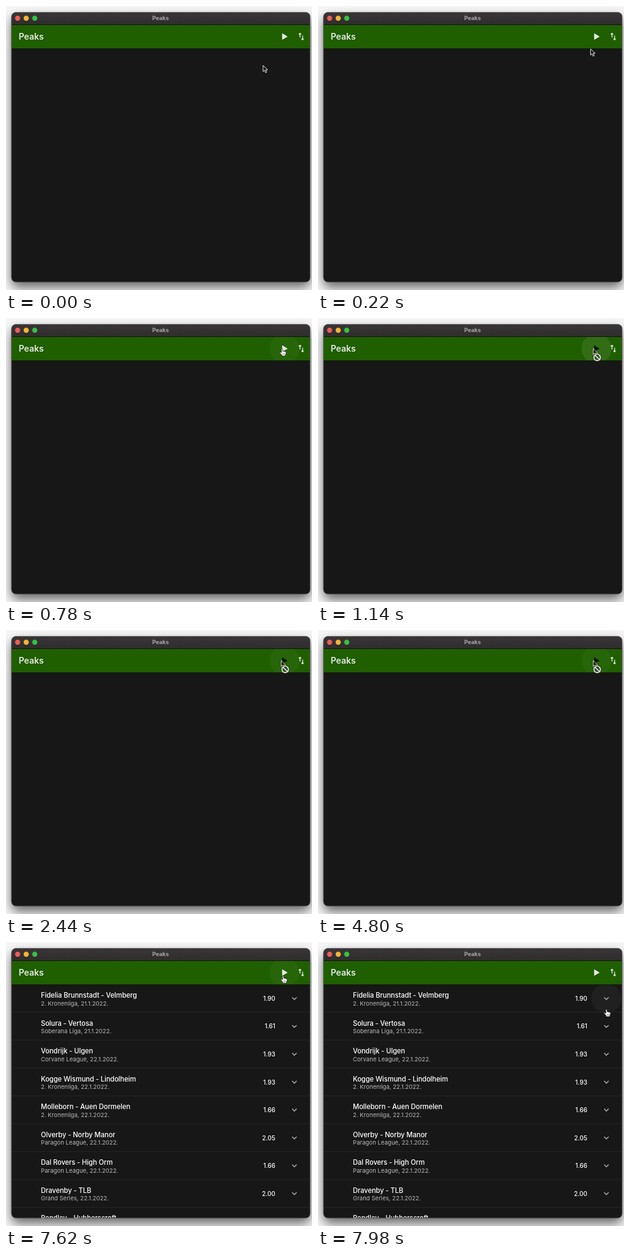
An HTML page that plays this animation: 500 px wide and 464 px high, repeating every 8 s.

```html
<!DOCTYPE html>
<html lang="en">
<head>
<meta charset="utf-8">
<title>Peaks</title>
<style>
  html, body { margin: 0; width: 100%; height: 100%; overflow: hidden; background: #f4f4f4; }
  svg { display: block; width: 100%; height: 100%; }
  text { font-family: Inter, Roboto, sans-serif; fill: #fff; }
  .bar { font-size: 9.1px; font-weight: 700; fill: #aaa7a8; text-anchor: middle; }
  .head { font-size: 14px; font-weight: 600; fill: #e4eadf; }
  .game { font-size: 11.2px; font-weight: 500; letter-spacing: -.08px; }
  .league { font-size: 9.6px; fill: #b9b9b9; }
  .odds { font-size: 10px; font-weight: 500; text-anchor: end; }
  .tip { font-size: 7.1px; font-weight: 500; fill: #111; text-anchor: middle; }
</style>
</head>
<body>
<svg viewBox="0 0 500 464">
  <defs>
    <clipPath id="win"><rect x="9" y="10.5" width="488" height="440.5" rx="7"/></clipPath>
    <clipPath id="appbar"><rect x="9" y="31" width="488" height="38"/></clipPath>
    <clipPath id="body"><rect x="9" y="70" width="488" height="381"/></clipPath>
    <linearGradient id="title" x2="0" y2="1">
      <stop stop-color="#3a3637"/><stop offset="1" stop-color="#302d2e"/>
    </linearGradient>
    <filter id="blur" x="-20%" y="-20%" width="140%" height="140%"><feGaussianBlur stdDeviation="9"/></filter>
  </defs>

  <rect width="500" height="464" fill="#f6f6f6"/>
  <rect x="9" y="19" width="488" height="441" rx="9" fill="#000" opacity=".58" filter="url(#blur)"/>

  <g clip-path="url(#win)">
    <rect x="9" y="10" width="488" height="442" fill="#171717"/>
    <rect x="9" y="10" width="488" height="20.5" fill="url(#title)"/>
    <rect x="9" y="30" width="488" height="1" fill="#111"/>
    <circle cx="19" cy="20" r="4.2" fill="#ee5b54"/>
    <circle cx="33" cy="20" r="4.2" fill="#f4b62f"/>
    <circle cx="47" cy="20" r="4.2" fill="#35c13f"/>
    <text class="bar" x="252.5" y="23.2">Peaks</text>

    <g id="list" clip-path="url(#body)">
      <circle id="rowHover" cx="471" cy="92" r="24.5" fill="#fff"/>
    </g>

    <rect x="9" y="69" width="488" height="1.5" fill="#0d1209"/>
    <rect x="9" y="31" width="488" height="38.3" fill="#1f5f00"/>
    <g clip-path="url(#appbar)">
      <circle id="hover" cx="455" cy="50" r="24.5" fill="#fff"/>
      <circle id="splash" cx="455" cy="50" fill="#fff"/>
    </g>
    <text class="head" x="20.7" y="54.9">Peaks</text>
    <path id="play" d="M451.2 44.6v10.6l9-5.3z"/>
    <path transform="translate(474.1 41.5) scale(.7)" fill="#e4eadf"
      d="M9 3L5 7h3v7h2V7h3zM16 17v-7h-2v7h-3l4 4 4-4z"/>
  </g>
  <rect x="8.9" y="10.4" width="488" height="440.6" rx="7.5" fill="none" stroke="#555354"/>

  <g id="tooltip">
    <rect x="422.5" y="67" width="64.5" height="16.7" rx="2.8" fill="#fff" opacity=".9"/>
    <text class="tip" x="454.7" y="78">Find candidates</text>
  </g>

  <g id="arrow" fill="#111" stroke="#fff" stroke-width=".9" stroke-linejoin="round">
    <path d="M0 0V10.2L2.4 8l1.7 3.9 1.8-.8L4.3 7.3h3.2z"/>
  </g>
  <g id="hand" stroke="#111" stroke-width=".75" fill="#fff" stroke-linejoin="round">
    <path d="M-1.2 1C-1.2-.4.8-.4.9 1L1.2 4.3C2 3.6 2.9 3.9 3.1 4.6 4 4.1 4.8 4.5 5 5.2c1-.3 1.7.3 1.7 1.2 0 2-.6 3.1-1.1 4.1V12H-.4v-1.2C-1.2 9.5-2.5 8.1-3.4 6.8c-.7-1.1.5-1.9 1.4-1.1l1.2 1z"/>
    <path d="M1.2 8v2.3M2.8 8v2.3M4.4 8v2.3" stroke-width=".5"/>
  </g>
  <g id="blocked" fill="none">
    <path d="M0 0V9.6L2.2 7.5h4.9z" fill="#111" stroke="#fff" stroke-width=".8"/>
    <g stroke="#222" stroke-width="3"><circle cx="6.4" cy="14.3" r="5.3"/><path d="M2.7 10.6l7.4 7.4"/></g>
    <g stroke="#eee" stroke-width="1.7"><circle cx="6.4" cy="14.3" r="5.3"/><path d="M2.7 10.6l7.4 7.4"/></g>
  </g>
</svg>

<script>
const LOOP = 8000, ROW = 45.55;
const PRESS = 980, BUSY = 1080, READY = 7000, LISTED = 7020;
const $ = id => document.getElementById(id);
const clamp = v => Math.min(1, Math.max(0, v));
const span = (t, a, b) => clamp((t - a) / (b - a));
const easeOut = (p, n) => 1 - (1 - p) ** n;
const smooth = p => p * p * (3 - 2 * p);
const mix = (a, b, p) => a + (b - a) * p;

const games = [
  ["Fidelia Brunnstadt - Velmberg", "2. Kronenliga, 21", "1.90"],
  ["Solura - Vertosa", "Soberana Liga, 21", "1.61"],
  ["Vondrijk - Ulgen", "Corvane League, 22", "1.93"],
  ["Kogge Wismund - Lindolheim", "2. Kronenliga, 22", "1.93"],
  ["Molleborn - Auen Dormelen", "2. Kronenliga, 22", "1.66"],
  ["Olverby - Norby Manor", "Paragon League, 22", "2.05"],
  ["Dal Rovers - High Orm", "Paragon League, 22", "1.66"],
  ["Dravenby - TLB", "Grand Series, 22", "2.00"],
  ["Rondley - Hubberscroft", "Grand Series, 22", "1.85"]
];

$("list").insertAdjacentHTML("beforeend", games.map(([game, league, odds], i) => `
  <g transform="translate(0 ${i * ROW})">
    <text class="game" x="57" y="91">${game}</text>
    <text class="league" x="57" y="103.6">${league}.1.2022.</text>
    <text class="odds" x="440" y="95.9">${odds}</text>
    <path d="M467.6 90.4l3.6 3.6 3.6-3.6" fill="none" stroke="#b4b4b4" stroke-width="1.4"/>
    <rect x="9" y="114.3" width="488" height=".8" fill="#292929"/>
  </g>`).join(""));

function pointer(t) {
  if (t < 7540) {
    const p = span(t, 20, 600);
    return [mix(420, 451, easeOut(p, 4)), mix(97, 50, easeOut(p, 2))];
  }
  const p = smooth(span(t, 7540, 7990));
  return [mix(451, 471.3, p), mix(50, 110, p)];
}

function show(id, alpha) {
  $(id).setAttribute("opacity", alpha);
}

function draw(t) {
  const [x, y] = pointer(t);
  const busy = t >= BUSY && t < LISTED;
  const kind = t >= BUSY && t < READY ? "blocked" : y > 68 && t < PRESS ? "arrow" : "hand";
  for (const id of ["arrow", "hand", "blocked"]) {
    show(id, +(id === kind));
    $(id).setAttribute("transform", `translate(${x - (id === "blocked") * 1.2} ${y})`);
  }
  $("play").setAttribute("fill", busy ? "#0c1606" : "#e4eadf");

  show("hover", .035 * span(t, 220, 270) * (1 - span(t, 7690, 7740)));
  const press = span(t, PRESS, 1140);
  $("splash").setAttribute("r", 24.5 * easeOut(press, 2));
  show("splash", t < PRESS ? 0 : .07 * (1 - span(t, 1100, 1240)));

  show("tooltip", t < 780 ? span(t, 240, 390) : 0);
  show("list", +(t >= LISTED));
  show("rowHover", .04 * span(t, 7750, 7800));
}

function tick(now) {
  draw(now % LOOP);
  requestAnimationFrame(tick);
}
draw(0);
requestAnimationFrame(tick);
</script>
</body>
</html>
```
